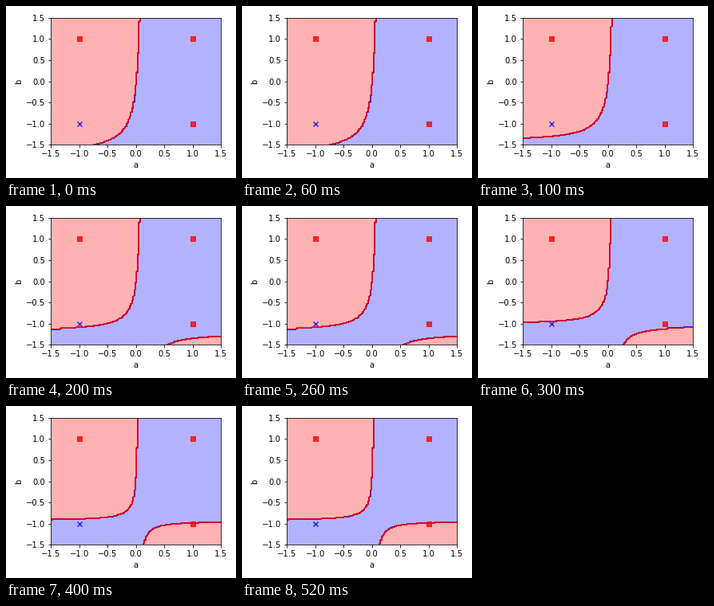
A matplotlib script for the animation above (600 ms loop, 288 by 216 pixels).

```python
import numpy as np
import matplotlib.pyplot as plt
from matplotlib.animation import FuncAnimation

LIMIT = 1.5
TICKS = np.linspace(-LIMIT, LIMIT, 7)
COLORS = ["blue", "red"]
STEP_MS = 100
FRAMES = 6
LAST_STEP = 4

axis = np.linspace(-LIMIT, LIMIT, 151)
grid_a, grid_b = np.meshgrid(axis, axis)

fig, ax = plt.subplots(figsize=(4, 3), dpi=72)
ax.set(xlim=(-LIMIT, LIMIT), ylim=(-LIMIT, LIMIT),
       xticks=TICKS, yticks=TICKS, xlabel="a", ylabel="b")
fig.tight_layout()

ax.scatter([-1, 1, 1], [1, 1, -1], c="red", marker="s", alpha=0.8)
ax.scatter([-1], [-1], c="blue", marker="x", alpha=0.8)

regions = []


def classify(u):
    """Return 1 in the red region and 0 in the blue one, at progress u."""
    a0 = 0.125 - 0.076 * u ** 2.3
    b0 = -1.732 + 0.811 * np.sin(1.4 * u)
    bias = -0.012 + 0.016 * u
    score = grid_a * grid_b - b0 * grid_a - a0 * grid_b + bias
    return (score < 0).astype(float)


def update(i):
    while regions:
        regions.pop().remove()
    z = classify(min(i / LAST_STEP, 1))
    regions.append(ax.contourf(grid_a, grid_b, z, levels=[-1, 0.5, 2],
                               colors=COLORS, alpha=0.3, zorder=0.5))
    # Two nearly coincident lines, red over blue, make a thin crimson edge.
    regions.append(ax.contour(grid_a, grid_b, z, levels=[0.45, 0.55],
                              colors=COLORS, alpha=0.8, linewidths=0.9,
                              antialiased=False, zorder=2))
    return regions


anim = FuncAnimation(fig, update, frames=FRAMES, interval=STEP_MS,
                     repeat=True, repeat_delay=0, blit=False)

plt.show()
```
